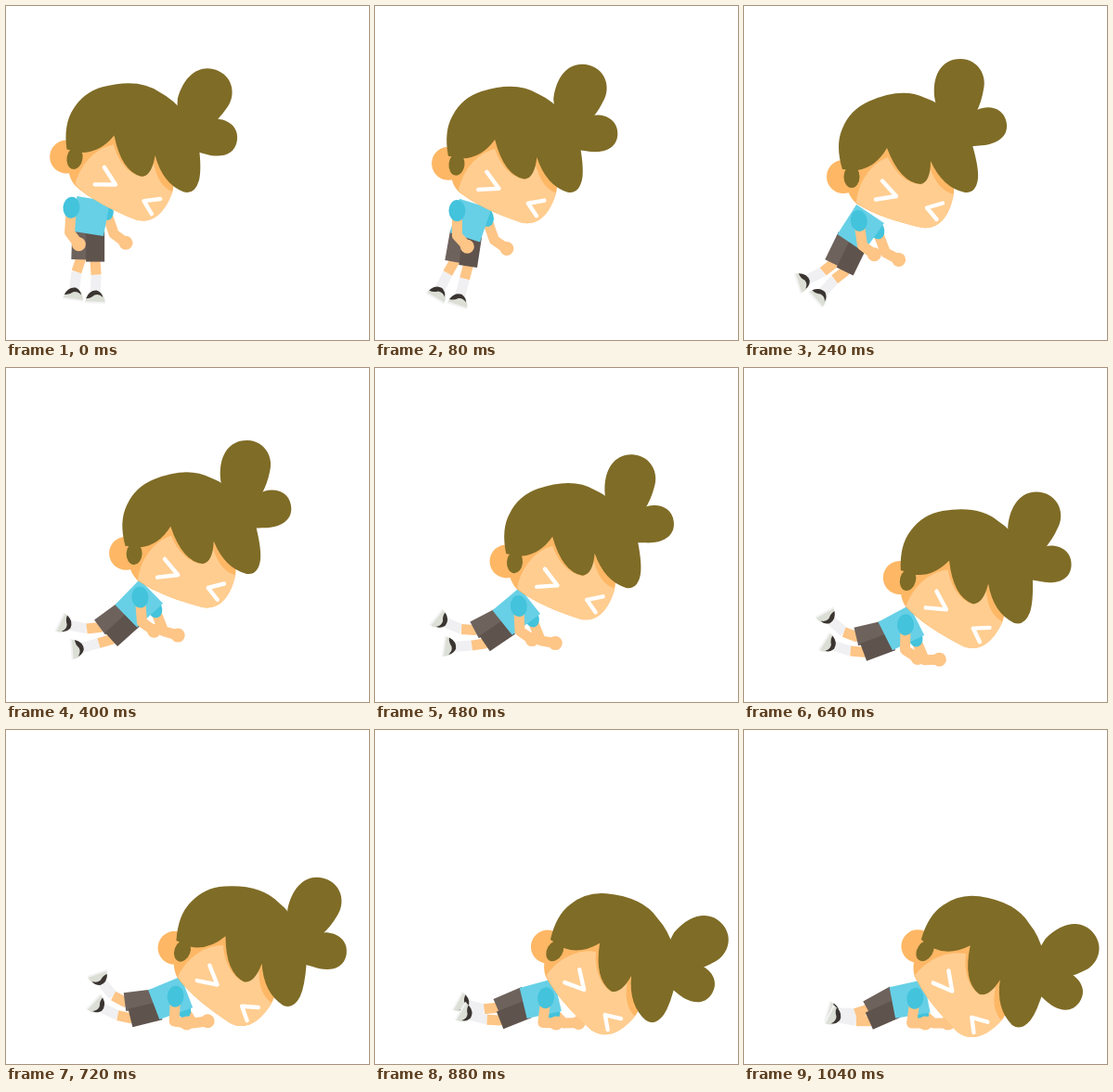
Recreate the animation shown at these times as an HTML page. Size 391 by 360 pixels, loop 1.12 s.

```html
<!DOCTYPE html>
<html lang="en">
<head>
<meta charset="utf-8">
<title>Tumble</title>
<style>
  html, body { margin: 0; width: 100%; height: 100%; overflow: hidden; background: #fff; }
  svg { display: block; width: 391px; height: 360px; }
  .limb { fill: none; stroke: #fdc586; stroke-width: 11; stroke-linejoin: round; }
  .sock { stroke: #f0f0f2; }
  .near { stroke: #5f534d; stroke-width: 20; }
  .far { stroke: #6e625d; stroke-width: 20; }
  .hand { fill: #fdc586; }
  .sleeve { fill: #43c3dc; }
  .hair { fill: #7f6c26; }
  .eye { fill: none; stroke: #fff; stroke-width: 4.4; stroke-linecap: round; stroke-linejoin: round; }
</style>
</head>
<body>
<svg viewBox="0 0 391 360">
  <defs>
    <g id="shoe">
      <path fill="#dcdfd6" d="M-11 6Q-9-6 1-7Q10-4 11 6Z"/>
      <path fill="#3b3532" d="M-10 2Q-7-7 1-7Q7-5 8 0Q4-4-1-2Q-5 2-10 2Z"/>
      <path fill="none" stroke="#f3f3f3" stroke-width="2" d="M-11 6H11"/>
    </g>
  </defs>
  <path id="sockL" class="limb sock"/><path id="legL" class="limb"/>
  <use id="shoeL" href="#shoe"/>
  <path id="sockR" class="limb sock"/><path id="legR" class="limb"/>
  <use id="shoeR" href="#shoe"/>
  <path id="shortsL" class="limb far"/><path id="shortsR" class="limb near"/>
  <path id="armR" class="limb"/><circle id="handR" class="hand" r="7.5"/>
  <ellipse id="sleeveR" class="sleeve" rx="8" ry="11"/>
  <path id="torso" fill="#67d0e6"/>
  <path id="armL" class="limb"/><circle id="handL" class="hand" r="7.5"/>
  <ellipse id="sleeveL" class="sleeve" rx="9" ry="11.5"/>
  <!-- The head turns around the sideburn. -->
  <g id="head"><g transform="translate(-116 -184)">
    <circle cx="107" cy="184" r="18" fill="#fdb765"/>
    <path fill="#fdb765" d="M108 165Q106 200 121 213C140 225 165 233 192 239C212 241 222 224 226 201V150L120 140Z"/>
    <path fill="#ffcd90" d="M121 212C123 190 136 170 155 163C163 181 178 193 192 192L201 176C206 190 214 200 226 203C222 224 212 241 192 239C165 233 140 225 121 212Z"/>
    <path class="hair" d="M106 176Q98 150 106 132Q114 112 134 103Q170 87 195 99Q228 110 246 150Q253 174 252 186Q250 202 238 201Q214 196 201 167Q201 190 190 192Q168 190 154 153Q142 174 122 177Z"/>
    <ellipse class="hair" cx="116" cy="184" rx="8.5" ry="12"/>
    <path class="eye" d="M149 188.5L164 205L142 208.5M214 212.5L197 217.5L207.5 230"/>
    <g id="bigBun"><path class="hair" transform="translate(232 83)" d="M-14 48L-26 20C-31-8-19-26 1-26C20-26 30-8 26 7Q24 20 18 32L14 48Z"/></g>
    <g id="smallBun"><path class="hair" transform="translate(263 129) rotate(-12)" d="M-40-14L-14-17C0-24 20-18 20 0C20 18 2 22-14 19L-40 16Z"/></g>
  </g></g>
</svg>
<script>
const STEP = 80, LOOP = 1120, FLOOR = 316;
const SPINE = 38, THIGH = 29, SHIN = 14, FOOT = 24, UPPER_ARM = 27, FOREARM = 16;

// Four poses of one skeleton; limbs hold the directions of their bones in degrees.
const poses = [
  { step: 0, head: [74, 164], tilt: 9.3, swing: 16, neck: 27, spine: 99, turn: 22,
    legL: [92, 108, 97], legR: [90, 86, 92], armL: [94, 52], armR: [71, 37] },
  { step: 3, head: [116, 184], tilt: 0, swing: 0, neck: 20, spine: 124, turn: 6,
    legL: [116, 142, 153], legR: [116, 142, 132], armL: [82, 37], armR: [69, 28] },
  { step: 9, head: [190, 238], tilt: 20.5, swing: 1, neck: 20, spine: 159, turn: 0,
    legL: [173, 208, 230], legR: [166, 192, 206], armL: [93, 32], armR: [67, -8] },
  { step: 13, head: [195, 238], tilt: 32.5, swing: 22, neck: 28, spine: 169, turn: 0,
    legL: [151, 162, 182], legR: [156, 180, 191], armL: [98, 25], armR: [60, 0] }
];

const fallPower = { head: 1.1, tilt: 2, legL: 0.65, legR: 0.75 };
const easeOut = (k, power) => 1 - (1 - k) ** power;
const stages = [
  k => k,
  (k, field) => k ** (fallPower[field] ?? 1),
  (k, field) => easeOut(k, field === "swing" ? 5 : 2)
];

const lerp = (a, b, k) => Array.isArray(a) ? a.map((v, i) => lerp(v, b[i], k)) : a + (b - a) * k;

function poseAt(step) {
  const i = step < poses[1].step ? 0 : step < poses[2].step ? 1 : 2;
  const from = poses[i], to = poses[i + 1];
  const k = (step - from.step) / (to.step - from.step);
  const fields = Object.keys(from);
  return Object.fromEntries(fields.map(f => [f, lerp(from[f], to[f], stages[i](k, f))]));
}

const part = id => document.getElementById(id);
const draw = (id, ...points) => part(id).setAttribute("d", "M" + points.flat().join(" "));
const transform = (id, value) => part(id).setAttribute("transform", value);
const place = (id, [x, y], angle = 0) => transform(id, `translate(${x} ${y}) rotate(${angle})`);

// The point at a distance from another, in a direction in degrees.
function along([x, y], angle, length) {
  const a = angle * Math.PI / 180;
  return [x + Math.cos(a) * length, y + Math.sin(a) * length];
}
const onFloor = ([x, y]) => [x, Math.min(y, FLOOR)];

function drawLeg(side, hip, [thigh, shin, foot]) {
  const hem = along(hip, thigh, THIGH);
  const ankle = along(hem, shin, SHIN);
  const sole = along(ankle, foot, FOOT);
  draw("shorts" + side, along(hip, thigh, -4), hem);
  draw("leg" + side, along(hem, thigh, -3), hem, ankle);
  draw("sock" + side, ankle, sole);
  place("shoe" + side, sole, (foot - 90) * 1.15);
}

function drawArm(side, shoulder, [upper, fore]) {
  const elbow = onFloor(along(shoulder, upper, UPPER_ARM));
  const hand = onFloor(along(elbow, fore, FOREARM));
  draw("arm" + side, shoulder, elbow, hand);
  place("hand" + side, hand);
  place("sleeve" + side, shoulder, upper - 90);
}

function render(time) {
  const pose = poseAt(Math.floor((time % LOOP) / STEP));
  place("head", pose.head, pose.tilt);
  transform("bigBun", `rotate(${pose.swing} 210.6 135)`);
  transform("smallBun", `rotate(${pose.swing * 0.65} 219 147)`);

  const across = pose.spine + 90;
  const neck = along(along(pose.head, pose.tilt, pose.neck), pose.tilt + 90, 40);
  const hip = along(neck, pose.spine, SPINE);
  draw("torso", along(neck, across, 18), along(neck, across, -18),
    along(hip, across, -17), along(hip, across, 17));

  drawLeg("L", along(hip, across, 7), pose.legL);
  drawLeg("R", along(hip, across, -8), pose.legR);
  drawArm("L", along(along(neck, pose.spine, 13), across, pose.turn), pose.armL);
  drawArm("R", along(along(neck, pose.spine, 10), across, -15), pose.armR);
}

const start = performance.now();
function tick() {
  render(performance.now() - start);
  requestAnimationFrame(tick);
}
tick();
</script>
</body>
</html>
```
